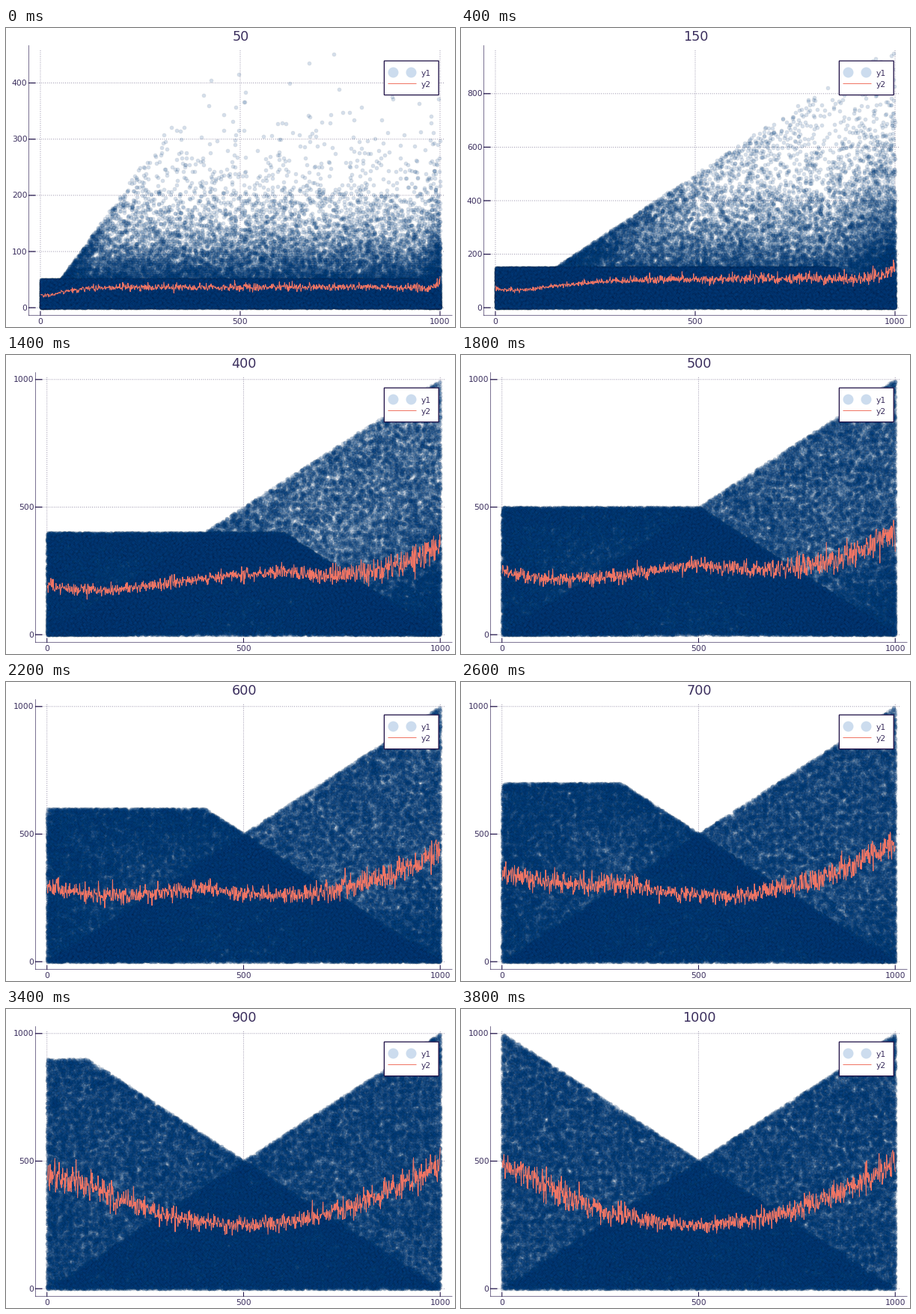
Write a matplotlib script that moves like this. It is 600x400 px and loops after 4 s.

```python
import numpy as np
import matplotlib.pyplot as plt
from matplotlib.animation import FuncAnimation
from matplotlib.patches import Rectangle

# Displacement of items passed through a shuffle buffer of growing size.
SIZE, TRIALS, STEPS = 1000, 100, 20
PX = 0.72  # points per pixel at 100 dpi
INK, CORAL = "#1f1147", "#f07564"
KEY_BLUE, DOT_BLUE, DOT_EDGE = (0, 0.33, 0.68, 0.2), (0, 0.25, 0.52, 0.17), (0, 0, 0, 0.08)
TOP, BOTTOM, RIGHT = 23.6, 384.4, 596
POS = np.arange(1, SIZE + 1)


def reach(n):
    """Farthest displacement shown for a buffer of n items."""
    return 997 * np.tanh(0.49 * (n / 50) ** 1.22)


def distances(n):
    """Distance each output travelled, one row per trial."""
    rng = np.random.default_rng(n)
    rows = np.arange(TRIALS)
    buf = np.tile(np.arange(1, n + 1), (TRIALS, 1))
    out = np.empty((TRIALS, SIZE), int)
    picks = rng.random((SIZE, TRIALS))
    for i in range(SIZE):
        live = min(n, SIZE - i)
        k = (picks[i] * live).astype(int)
        out[:, i] = buf[rows, k]
        buf[rows, k] = i + n + 1 if i + n < SIZE else buf[rows, live - 1]
    return np.abs(out - POS)


def dataset(n):
    dist = distances(n)
    x, y = np.tile(POS, TRIALS), dist.ravel()
    keep = y <= reach(n)
    return x[keep], y[keep], dist.mean(axis=0)


SIZES = [50 * (k + 1) for k in range(STEPS)]
DATA = [dataset(n) for n in SIZES]

plt.rcParams["font.family"] = "DejaVu Sans"
plt.rcParams["path.snap"] = False
fig = plt.figure(figsize=(6, 4), dpi=100, facecolor="white")
ax = fig.add_axes([0, 0, 1, 1])


def stroke(xs, ys, color=INK, width=1.0, **kw):
    ax.plot(xs, ys, color=color, lw=width * PX, **kw)


def label(x, y, text, size=10.8, **kw):
    ax.text(x, y, text, color=INK, fontsize=size * PX, alpha=0.88, **kw)


def dots(x, y, size, **kw):
    ax.plot(x, y, "o", ms=size * PX, **kw)


def legend():
    ax.add_patch(Rectangle((505.4, 44), 72.8, 45.6, fc="white", ec=INK,
                           lw=1.3 * PX, zorder=5))
    dots([517, 541], [59.3, 59.3], 14, mfc=KEY_BLUE, mec="none", zorder=6)
    stroke([511, 548], [74.5, 74.5], CORAL, zorder=6)
    label(554.5, 64, "y1", zorder=6)
    label(554.5, 79, "y2", zorder=6)


def draw(k):
    x, y, mean = DATA[k]
    peak = reach(SIZES[k])
    step = 100 if peak < 485 else 200 if peak < 971 else 500
    left = 39.5 if step == 500 else 30.5

    pad_x = (RIGHT - left) * 0.03 / 1.06
    pad_y = (BOTTOM - TOP) * 0.03 / 1.06

    def sx(v):
        return left + pad_x + (v - 1) / (SIZE - 1) * (RIGHT - left - 2 * pad_x)

    def sy(v):
        return BOTTOM - pad_y - v / peak * (BOTTOM - TOP - 2 * pad_y)

    ax.clear()
    ax.axis("off")
    ax.set(xlim=(0, 600), ylim=(400, 0))

    grid = dict(color=INK, width=0.9, alpha=0.55, ls=(0, (1, 2)), zorder=1)
    for v in (0, 500, 1000):
        px = sx(v)
        stroke([px, px], [30, BOTTOM], **grid)
        stroke([px, px], [BOTTOM, BOTTOM - 5], zorder=4)
        label(px, 393.3, str(v), ha="center", va="center")
    for v in range(0, int(peak * 1.03) + 1, step):
        py = sy(v)
        stroke([left, 586], [py, py], **grid)
        stroke([left, left + 8.5], [py, py], width=1.2, zorder=4)
        label(left - 2, py + 0.5, str(v), ha="right", va="center")

    stroke([left, left], [TOP, BOTTOM], width=0.9, alpha=0.65, zorder=4)
    stroke([left, RIGHT], [BOTTOM, BOTTOM], width=0.9, alpha=0.65, zorder=4)

    dots(sx(x), sy(y), 5.2, mfc=DOT_BLUE, mec=DOT_EDGE, mew=0.5 * PX, zorder=2)
    stroke(sx(POS), sy(mean), CORAL, zorder=3)
    label((left + RIGHT) / 2 + 0.5, 12.2, str(SIZES[k]), 17.6,
          ha="center", va="center")
    legend()
    return []


anim = FuncAnimation(fig, draw, frames=STEPS, init_func=lambda: [],
                     interval=200, repeat=True, repeat_delay=0)
plt.show()
```
